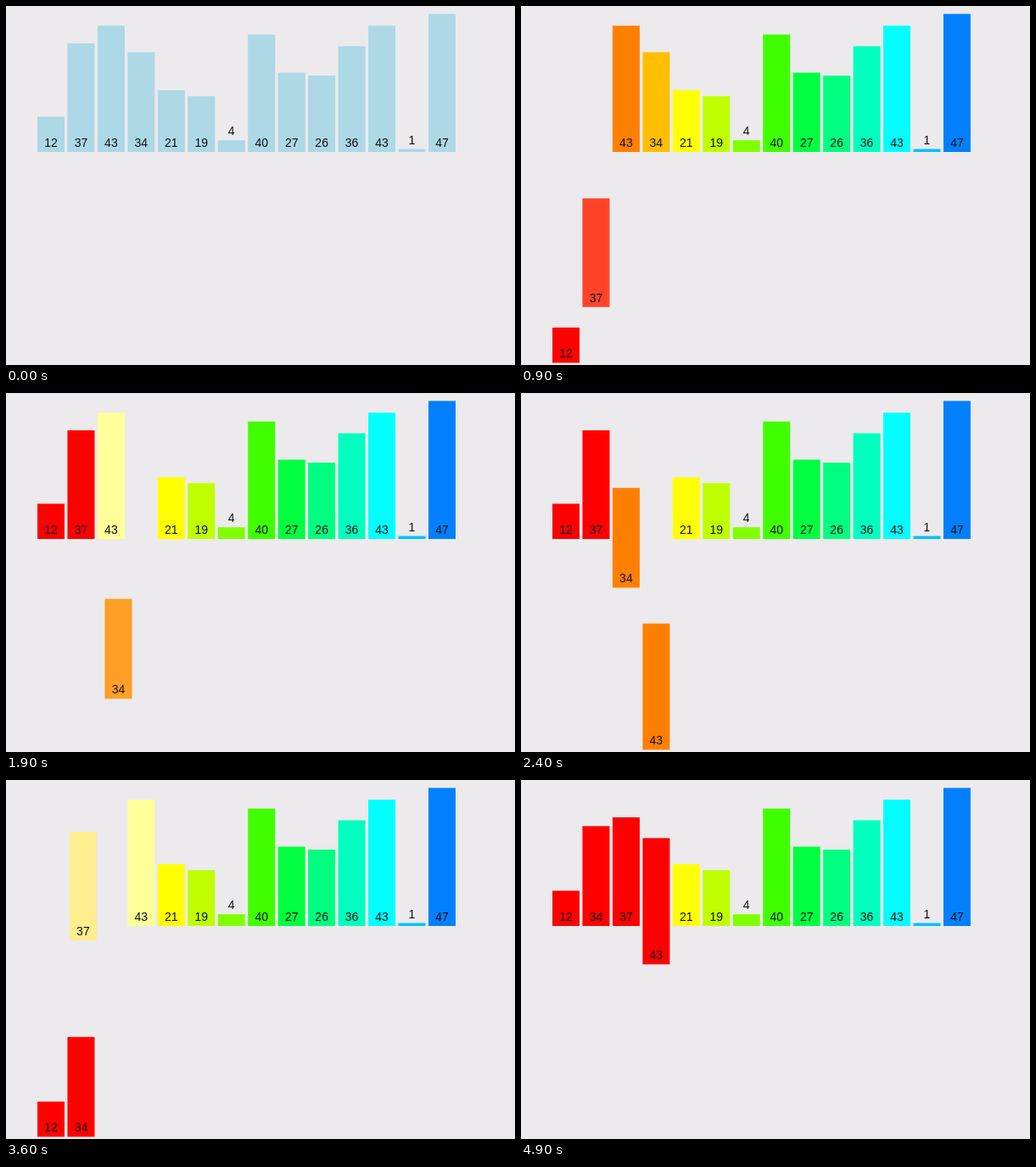
Animation, 600 px wide and 423 px high, one loop 5 s. Source, as an HTML page:

```html
<!DOCTYPE html>
<html lang="en">
<head>
<meta charset="utf-8">
<title>Merge sort</title>
<style>
  html, body { margin: 0; width: 100%; height: 100%; overflow: hidden; background: #eceaec; }
  svg { display: block; width: 600px; height: 423px; }
  text { font: 14px "Liberation Sans", Arial, sans-serif; text-anchor: middle; fill: #111; }
</style>
</head>
<body>
<svg id="stage" viewBox="0 0 600 423"></svg>
<script>
const LOOP = 5000, TICK = 100;
const START = 570, BEAT = 249.6, MOVE = 135;
const LEFT = 37, PITCH = 35.46, WIDTH = 32, BASE = 172, DROP = 248.4, UNIT = 3.46;

const values = [12, 37, 43, 34, 21, 19, 4, 40, 27, 26, 36, 43, 1, 47];
const BLUE = [173, 216, 230], RED = [255, 0, 0], ORANGE = [255, 128, 0];
const PALE = [255, 255, 153], PINK = [255, 150, 150];

// Hue steps of 15 degrees that skip pure green.
function rainbow(i) {
  const h = (i < 8 ? i : i + 1) / 4;
  const channel = shift => {
    const d = Math.abs(((h + shift) % 6) - 3);
    return Math.round(255 * Math.min(1, Math.max(0, d - 1)));
  };
  return [channel(0), channel(4), channel(2)];
}

// Each step: beat, bar, changes (slot, depth, color), optional delay in ms.
const steps = [
  ...values.map((_, i) => [-2, i, { color: rainbow(i) }]),
  [-1, 0, { color: PINK }],
  [-1, 1, { color: PALE }],
  [0, 0, { depth: 1, color: RED }],
  [1, 1, { depth: 1, color: RED }],
  [2, 0, { depth: 0 }],
  [3, 1, { depth: 0 }],
  [4, 2, { color: PALE }],
  [4, 3, { color: PALE }],
  [5, 3, { slot: 2, depth: 1, color: ORANGE }],
  [6, 2, { slot: 3, depth: 1, color: ORANGE }],
  [7, 3, { depth: 0 }],
  [8, 2, { depth: 0 }],
  [9, 0, { color: PINK }],
  [9, 3, { color: PALE }],
  [10, 0, { depth: 1, color: RED }, 17],
  [10, 1, { color: PALE }, 17],
  [11, 3, { slot: 1, depth: 1, color: RED }],
  [11, 2, { color: PALE }],
  [12, 1, { slot: 2, depth: 1, color: RED }],
  [13, 2, { slot: 3, depth: 1, color: RED }],
  [14, 0, { depth: 0 }],
  [15, 3, { depth: 0 }],
  [16, 1, { depth: 0 }],
  [17, 2, { depth: 0 }]
];

const stage = document.getElementById("stage");

function add(parent, tag, attrs) {
  const el = document.createElementNS("http://www.w3.org/2000/svg", tag);
  for (const key in attrs) el.setAttribute(key, attrs[key]);
  return parent.appendChild(el);
}

const bars = values.map(value => {
  const height = value * UNIT;
  const group = add(stage, "g", {});
  const rect = add(group, "rect", { y: -height, width: WIDTH, height });
  const label = add(group, "text", { x: WIDTH / 2, y: height < 20 ? -height - 6 : -6 });
  label.textContent = value;
  return { group, rect };
});

const mix = (a, b, p) => a + (b - a) * p;

function ease(u) {
  u = Math.min(1, Math.max(0, u));
  return u < 0.5 ? 4 * u ** 3 : 1 - 4 * (1 - u) ** 3;
}

function draw(time) {
  const state = values.map((_, i) => ({ slot: i, depth: 0, color: BLUE }));
  for (const [beat, i, to, delay = 0] of steps) {
    const p = ease((time - START - beat * BEAT - delay) / MOVE);
    if (!p) continue;
    const s = state[i];
    if ("slot" in to) s.slot = mix(s.slot, to.slot, p);
    if ("depth" in to) s.depth = mix(s.depth, to.depth, p);
    if (to.color) s.color = s.color.map((c, k) => mix(c, to.color[k], p));
  }
  state.forEach((s, i) => {
    const x = LEFT + s.slot * PITCH, y = BASE + s.depth * DROP;
    bars[i].group.setAttribute("transform", `translate(${x.toFixed(2)} ${y.toFixed(2)})`);
    bars[i].rect.setAttribute("fill", `rgb(${s.color.map(Math.round)})`);
  });
}

function frame() {
  const t = performance.now() % LOOP;
  draw(Math.floor(t / TICK) * TICK);
  requestAnimationFrame(frame);
}
frame();
</script>
</body>
</html>
```
